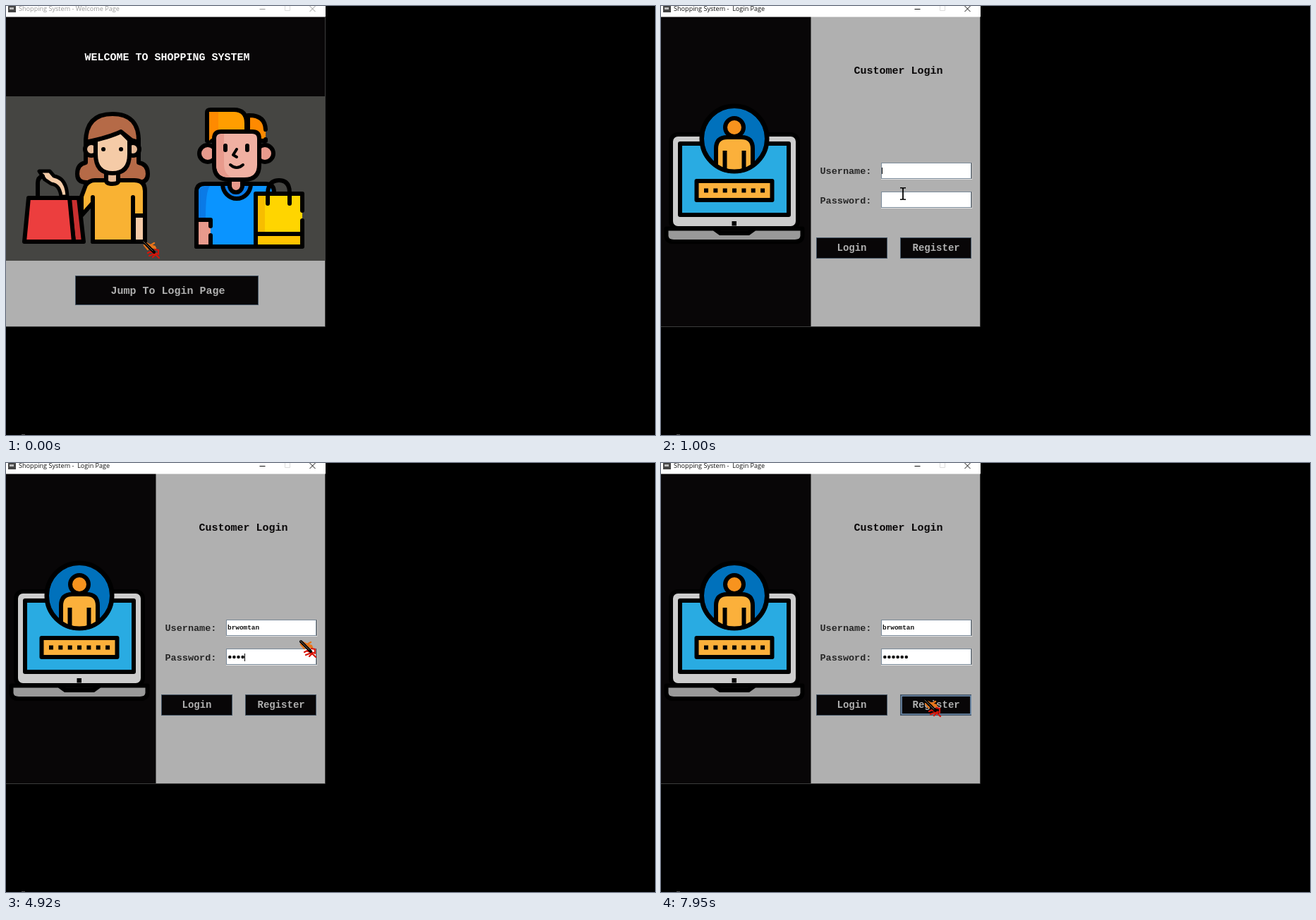
Animation of 920 by 608 pixels, one loop 8000 ms. Source, as an HTML page:

```html
<!DOCTYPE html>
<html lang="en">
<head>
<meta charset="utf-8">
<title>Shopping System</title>
<style>
html, body { margin: 0; width: 100%; height: 100%; overflow: hidden; background: #000; }
svg { display: block; width: 920px; height: 608px; }
text { white-space: pre; }
.mono { font: bold 15px "Liberation Mono", "DejaVu Sans Mono", monospace; }
.label { font-size: 13.5px; fill: #262626; }
.btn { font-size: 14px; fill: #b0b0b0; }
.entry { font-size: 9.4px; fill: #111; }
.ui { font: 9.1px "Open Sans", "Noto Sans", sans-serif; }
.msg { font: bold 9.2px "Liberation Sans", Arial, sans-serif; fill: #333; }
.desk { text-anchor: middle; fill: #fff; }
.o { stroke: #000; stroke-width: 6; stroke-linejoin: round; stroke-linecap: round; }
.l { fill: none; }
.f { stroke: none; }
.panel { fill: #080607; }
.button { fill: #080607; stroke: #465666; }
.field { fill: #fff; stroke: #7a8a99; }
.pressed { fill: #b8cfe5; stroke: #7a8a99; }
#dialog { filter: drop-shadow(0 2px 4px #0007); }
</style>
</head>
<body>
<svg viewBox="0 0 920 608">
  <defs>
    <clipPath id="badge"><circle cx="104" cy="188" r="46"/></clipPath>
    <linearGradient id="metal" x2="0" y2="1"><stop stop-color="#dde8f3"/><stop offset=".4" stop-color="#fff"/><stop offset="1" stop-color="#b8cfe5"/></linearGradient>
  </defs>
  <rect width="920" height="608"/>
  <g id="desktop"></g>
  <path d="M22 607.5h5" stroke="#555"/>

  <g id="welcome">
    <path class="panel" d="M-4 15H453V128H-4z"/>
    <path fill="#454542" d="M-4 128H453V361H-4z"/>
    <path fill="#b0b0b0" d="M-4 361H453V454H-4z"/>
    <text class="mono" x="111.5" y="77" fill="#fff">WELCOME TO SHOPPING SYSTEM</text>

    <g id="woman" class="o">
      <path fill="#b56a47" d="M113 190V222Q101 224 101 238Q101 250 114 250H188Q201 250 201 238Q201 224 188 222V190A38 38 0 0 0 113 190Z"/>
      <path fill="#f9b233" d="M123 334V279L107 297V270L113 254Q118 247 126 247H182Q197 247 197 262V334Z"/>
      <path fill="#f5cba7" d="M181 297H197V334H181Z"/>
      <path class="l" d="M123 271V334M180 271V334"/>
      <path fill="#e8bb98" d="M142 232V247Q142 252 151 252T159 247V232Z"/>
      <circle cx="121" cy="203" r="9" fill="#e8bb98"/><circle cx="180" cy="203" r="9" fill="#e8bb98"/>
      <path fill="#f5cba7" d="M127 190V210Q127 237 151 237T175 210V190L163 178Z"/>
      <path fill="#b56a47" d="M113 193Q113 153 151 153T188 193L178 190L163 178Q147 186 113 193Z"/>
      <path d="M138 203h.1M163 203h.1"/>
      <path fill="#f5cba7" stroke-width="5" d="M47 234L62 234L68 241Q86 244 87 270H78Q76 253 64 252L55 246Z"/>
      <path class="l" d="M45 272V251Q45 243 52 241"/>
      <path fill="#c92f2f" d="M89 272H103L110 334H96Z"/>
      <path fill="#ec3e3e" d="M32 272H90L96 334H26Z"/>
    </g>

    <g id="man" class="o">
      <path fill="#ff8a00" d="M368 189V191H343V155Q367 154 368 175"/>
      <path fill="#ff9d00" d="M285 191V151Q285 147 290 147H323Q341 147 341 166V191Z"/>
      <path class="f" fill="#ff8a00" d="M288 150H301V177L288 191Z"/>
      <path fill="#0a94ff" d="M270 341V263Q270 252 282 252H368Q380 252 380 264V341Z"/>
      <path class="f" fill="#0a7ae6" d="M273 300V264Q273 255 289 255Q283 262 283 300Z"/>
      <path fill="#0a7ae6" d="M307 252A20 21 0 0 0 347 252Z"/>
      <path fill="#e89a8c" d="M317 242V256Q319 264 326 264T335 256V242Z"/>
      <path class="f" fill="#e89a8c" d="M270 303H290V341H270Z"/>
      <path class="l" d="M290 312V303H270V341H290V325"/>
      <circle cx="286" cy="209" r="12" fill="#e89a8c"/><circle cx="367" cy="209" r="12" fill="#e89a8c"/>
      <path fill="#f0b0a2" d="M295 188Q295 178 305 178H349Q359 178 359 188V225Q359 246 338 246H316Q295 246 295 225Z"/>
      <path class="f" fill="#e89a8c" d="M298 190Q298 181 309 181V225Q309 237 319 243Q298 243 298 225Z"/>
      <path class="l" d="M311 198v6M342 198v6"/>
      <path class="l" stroke-width="4" d="M327 203L322 211L327 214M318 225Q327 233 336 225"/>
      <path class="l" d="M371 265Q372 247 387 247T402 265"/>
      <path fill="#ffd500" d="M420 290V266H354V341H420V304"/>
      <path class="f" fill="#f7bd00" d="M357 269H367V338H357Z"/>
      <path class="f" fill="#ffc400" d="M357 323H417V338H357Z"/>
      <path class="l" d="M354 323H420M371 266V280M402 266V280"/>
    </g>

    <rect id="jump" class="button" x="98.5" y="382.5" width="259" height="41"/>
    <text class="mono" x="148.5" y="408" fill="#b0b0b0">Jump To Login Page</text>
    <g class="titlebar" data-title="Shopping System - Welcome Page"></g>
  </g>

  <g id="login">
    <path class="panel" d="M-4 15H213V454H-4z"/>
    <path fill="#b0b0b0" d="M212.5 15H453V454H212.5z"/>
    <g id="laptop" class="o">
      <rect x="14" y="182" width="180" height="133" rx="10" fill="#ccc"/>
      <rect x="27" y="195" width="154" height="101" fill="#29abe2"/>
      <path fill="#999" d="M7.5 315.5H75L84 322H124L133 315.5H200.5V326Q200 334 190 334H18Q8 334 7.5 326Z"/>
      <rect class="f" x="100.5" y="305" width="6.5" height="6.5"/>
      <circle cx="104" cy="188" r="46" fill="#0071bc"/>
      <g clip-path="url(#badge)">
        <path fill="#fbb03b" d="M78 240V202Q78 186 94 186H114Q130 186 130 202V240Z"/>
        <path class="l" stroke-linecap="butt" d="M90.5 205V240M117.5 205V240"/>
      </g>
      <circle cx="104" cy="172" r="13" fill="#f7931e"/>
      <circle class="l" cx="104" cy="188" r="46.5"/>
      <rect x="50.5" y="248" width="107" height="27" fill="#fbb03b"/>
      <path stroke-linecap="butt" stroke-dasharray="6 7.35" d="M61 261.5H148"/>
    </g>
    <g class="mono">
      <text x="273.5" y="96" fill="#080607">Customer Login</text>
      <text class="label" x="225.5" y="238">Username:</text>
      <text class="label" x="225.5" y="279.5">Password:</text>
      <path stroke="#e6e6e6" d="M312 245.5h129V222M312 286.5h129V263"/>
      <rect class="field" x="312.5" y="222.5" width="127" height="22"/>
      <rect class="field" x="312.5" y="263.5" width="127" height="22"/>
      <text id="user" class="entry" x="314" y="236"></text>
      <path id="dots" stroke="#111" stroke-width="4.6" stroke-linecap="round"/>
      <path id="caret" stroke="#111"/>
      <rect id="signIn" class="button" x="220.5" y="328.5" width="100" height="29"/>
      <rect class="button" x="339.5" y="328.5" width="100" height="29"/>
      <rect id="focus" x="341" y="330" width="98" height="26" fill="none" stroke="#7b9cc0" stroke-width="1.5"/>
      <text class="btn" x="249.5" y="347">Login</text>
      <text class="btn" x="356.5" y="347">Register</text>
    </g>
    <g class="titlebar" data-title="Shopping System -  Login Page"></g>
  </g>

  <g id="dialog">
    <path fill="#eee" stroke="#777" stroke-width=".6" d="M106 176h236v94H106z"/>
    <path fill="#fff" d="M106.5 176.5h235V199h-235z"/>
    <text class="ui" x="112.5" y="191">Alert</text>
    <path stroke="#111" d="M326 183l8 8m0-8l-8 8"/>
    <path fill="#f7cf5c" stroke="#8a6420" stroke-width="1.2" stroke-linejoin="round" d="M125 208L135.5 228H115Z"/>
    <path stroke="#222" stroke-width="2" d="M125.2 214v7M125.2 223v2"/>
    <text class="msg" x="150.5" y="223.5">You entered wrong USER ID or Password.</text>
    <rect id="ok" x="209.5" y="239.5" width="29" height="19" fill="url(#metal)" stroke="#5f7080" stroke-width="1.5"/>
    <path fill="none" stroke="#8faacb" d="M216.5 242.5h15v13h-15z"/>
    <text class="msg" x="217" y="253">OK</text>
  </g>

  <g id="brush" fill="none" stroke-linecap="round">
    <path stroke="#e8751a" stroke-width="2.5" d="M5 3l6 3 5-3M9 6l8 2M11 9l7 1M2 6l5 6"/>
    <path stroke="#d81408" stroke-width="2.2" d="M7 17l6-3M9 21l8-3M14 23l4-4M17 12l5 1v6M17 18l6 6M12 16l8 2"/>
    <path stroke="#000" stroke-width="4" d="M2 2L16 16"/>
    <path stroke="#a08a70" stroke-width=".8" d="M1 1L14 14"/>
  </g>
  <g id="beam" fill="none" stroke="#000">
    <path stroke-width="1.8" d="M0-8V8"/>
    <path stroke-width="1.5" d="M-4-8.3h3l1 1 1-1h3M-4 8.3h3l1-1 1 1h3"/>
  </g>
</svg>
<script>
const LOOP = 8000, FADE = 250, KEY_GAP = 78, BLINK = 500;
const USER = "brwomtan";
const SWITCH = 600, TAB = 3210, LOGIN_CLICK = 5450, ALERT = 5797, CONFIRM = 7320;

// Bursts of typing: start time, number of keys
const userBursts = [[2250, 4], [2660, 3], [3050, 1]];
const passBursts = [[3900, 3], [4920, 3]];

// Pointer moves: start time, end time, x, y
const moves = [
  [0, 0, 194, 333], [70, 460, 255, 392], [760, 860, 345, 287], [900, 1150, 340, 228],
  [1320, 1640, 355, 231], [4860, 4920, 416, 251], [4960, 5400, 300, 350], [5850, 5930, 326, 338],
  [6000, 6780, 228, 212], [6840, 7240, 222, 249], [7400, 7940, 373, 335]
];

const $ = id => document.getElementById(id);
const show = (el, on) => el.setAttribute("visibility", on ? "visible" : "hidden");
const mix = (a, b, p) => a + (b - a) * p;
const progress = (t, start, length) => Math.min(1, Math.max(0, (t - start) / (length || 1)));
const easeOut = p => 1 - (1 - p) ** 2;
const smooth = p => p * p * (3 - 2 * p);
const fade = (t, start) => easeOut(progress(t, start, FADE));

function pose(id, amount, shrink, cx, cy) {
  const el = $(id), scale = mix(1 - shrink, 1, amount);
  el.setAttribute("opacity", amount);
  el.setAttribute("transform", `translate(${cx} ${cy}) scale(${scale}) translate(${-cx} ${-cy})`);
  show(el, amount > 0);
}

function pointerAt(t) {
  return moves.reduce(([x, y], [start, end, toX, toY]) => {
    const p = smooth(progress(t, start, end - start));
    return [mix(x, toX, p), mix(y, toY, p)];
  }, moves[0].slice(2));
}

const keyTimes = bursts => bursts.flatMap(([start, n]) => Array.from({ length: n }, (_, i) => start + i * KEY_GAP));
const userKeys = keyTimes(userBursts), passKeys = keyTimes(passBursts);
const caretResets = [SWITCH, ...userKeys, TAB, ...passKeys];
const countBefore = (times, t) => times.filter(k => k <= t).length;

function buildDesktop() {
  const folder = "#e6c878", paper = "#e4e9ee";
  const rows = [
    [["Python", "#f0d070", 1], ["Daily", folder]],
    [["Rarely Used", "#888"], ["GIT DOC", "#2f8fdc"]],
    [["icons", paper], ["c#", folder]],
    [["Eclipse\nProjects", "#9a8a8a", 1], ["19.21.txt", paper]],
    [["Tor Browser", "#9c8ca4", 1], ["C# exercises", paper]],
    [["pics", "#a89c82"]],
    [["Recycle Bin", "#ccd8df", 1]]
  ];
  $("desktop").innerHTML = rows.map((row, r) => row.map(([name, color, round], c) => {
    const x = 24 + 59 * c, y = 1 + 68.8 * r;
    const icon = round ? `<circle cx="${x}" cy="${y}" r="12" fill="${color}"/>`
      : `<path d="M${x - 9} ${y - 12}h9l3 3h7v21h-19z" fill="${color}"/>`;
    return icon + name.split("\n").map((line, i) =>
      `<text class="ui desk" x="${x}" y="${y + 25.5 + 11 * i}">${line}</text>`).join("");
  }).join("")).join("");
}

function buildTitleBars() {
  document.querySelectorAll(".titlebar").forEach(bar => {
    bar.innerHTML = `<path fill="#fff" d="M-4-9H453V15.5H-4z"/>
      <path fill="#454545" d="M3 0h11v9H3z"/><path fill="#bbb" d="M5 2h6v3H5z"/>
      <text class="ui" x="18" y="7.3">${bar.dataset.title}</text>
      <path class="controls" fill="none" d="M359.5 4.5h8M430.5 0l8 8m0-8l-8 8"/>
      <path fill="none" stroke="#ddd" d="M395.5-.5h7v7h-7z"/>
      <path fill="none" stroke="#3c3c3c" d="M452.5 15.5V454.5H-4"/>`;
  });
}

function setActive(id, on) {
  const bar = $(id).querySelector(".titlebar"), color = on ? "#111" : "#999";
  bar.querySelector("text").setAttribute("fill", color);
  bar.querySelector(".controls").setAttribute("stroke", color);
}

function renderEntry(t) {
  const letters = countBefore(userKeys, t), dots = countBefore(passKeys, t);
  $("user").textContent = USER.slice(0, letters);
  $("dots").setAttribute("d", passKeys.slice(0, dots).map((_, i) => `M${317.3 + 6.1 * i} 275h.01`).join(""));

  const inPassword = t >= TAB;
  const x = Math.floor(inPassword ? 314.5 + 6.1 * dots : 313.5 + 5.64 * letters) + .5;
  const idle = t - Math.max(...caretResets.filter(k => k <= t));
  $("caret").setAttribute("d", inPassword ? `M${x} 270v11` : `M${x} 229v9`);
  $("caret").setAttribute("opacity", t < LOGIN_CLICK && idle % (2 * BLINK) < BLINK ? 1 : 0);
}

function render(t) {
  pose("welcome", 1 - fade(t, SWITCH), .067, 215, 205);
  pose("login", fade(t, SWITCH), .045, 212, 216);
  pose("dialog", fade(t, ALERT) - fade(t, CONFIRM), .045, 224, 223);
  setActive("welcome", t >= 460);
  setActive("login", t < 5620 || t >= CONFIRM);
  $("jump").setAttribute("class", t >= 530 ? "pressed" : "button");
  $("signIn").setAttribute("class", t >= LOGIN_CLICK && t < CONFIRM ? "pressed" : "button");
  $("ok").setAttribute("fill", t >= 7240 ? "#b8cfe5" : "url(#metal)");
  show($("focus"), t >= 7940);
  renderEntry(t);

  const overField = t >= 850 && t < 4910;
  for (const [id, on] of [["brush", !overField], ["beam", overField]]) {
    $(id).setAttribute("transform", `translate(${pointerAt(t).map(Math.round)})`);
    show($(id), on);
  }
}

buildDesktop();
buildTitleBars();

const origin = performance.now();
function frame() {
  render((performance.now() - origin) % LOOP);
  requestAnimationFrame(frame);
}
frame();
</script>
</body>
</html>
```
